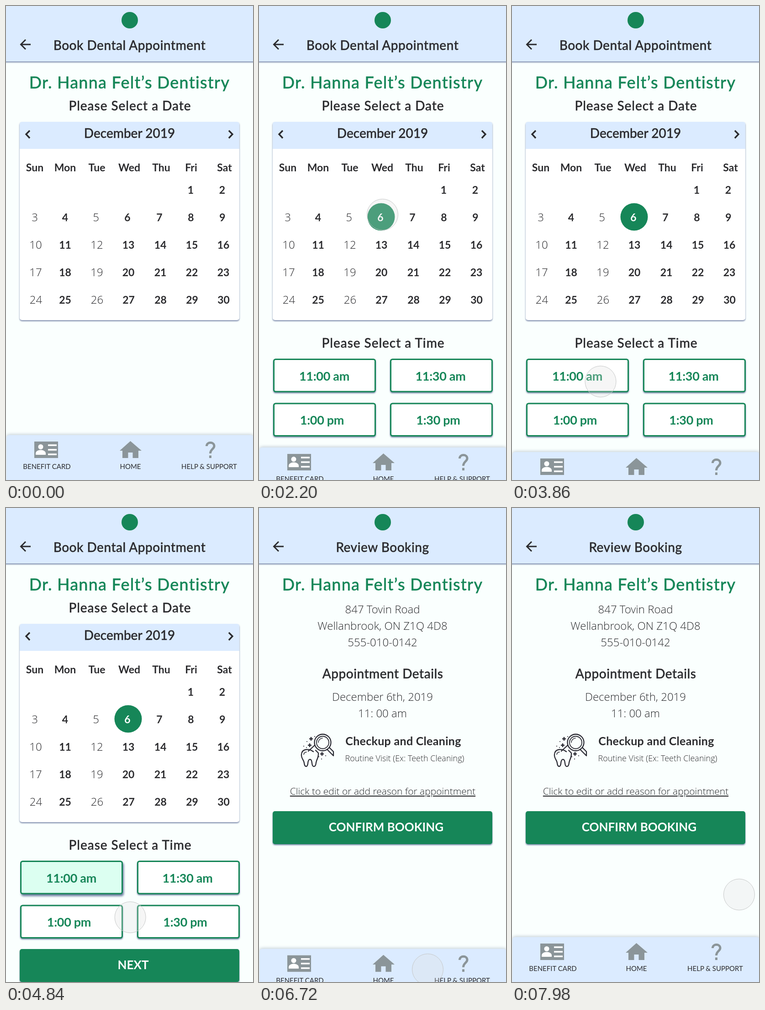
Recreate the animation shown at these times as an HTML page. Size 541 by 1035 pixels, loop 8000 ms.

```html
<!DOCTYPE html>
<html lang="en">
<head>
<meta charset="utf-8">
<title>Appointment booking</title>
<style>
  html, body { margin: 0; width: 100%; height: 100%; overflow: hidden; background: #fafffe; }
  svg { position: fixed; inset: 0; width: 100%; height: 100%; display: block; }
  text { fill: #2b2b2e; font-family: Lato, sans-serif; }
  .title { font-size: 36px; font-weight: 500; letter-spacing: 1.2px; fill: #168658; stroke: #168658; stroke-width: .4px; }
  .head { font-size: 28px; font-weight: 500; letter-spacing: .5px; stroke: #2b2b2e; stroke-width: .4px; }
  .wide { letter-spacing: .95px; }
  .month { letter-spacing: 0; }
  .bold { font-size: 23px; font-weight: 700; }
  .service { font-size: 25px; font-weight: 700; letter-spacing: .3px; }
  .time { font-size: 27px; font-weight: 700; letter-spacing: -.3px; fill: #168658; }
  .action { font-size: 26px; font-weight: 700; fill: #fff; }
  .label { font-size: 15px; }
  .light { font-family: "Open Sans", "Noto Sans", sans-serif; font-weight: 300; font-size: 24px; }
  .note { font-size: 18px; }
  .link { font-size: 21px; text-decoration: underline; }
  .line { fill: none; stroke: #2b2b2e; stroke-width: 3; }
  .shade { filter: drop-shadow(0 2px 1.5px rgba(60, 80, 130, .7)); }
  .chosen { filter: drop-shadow(2px 4px 2px rgba(60, 80, 130, .75)); }
  .lift { filter: drop-shadow(0 -2px 3px rgba(110, 125, 150, .35)); }
</style>
</head>
<body>
<svg id="stage" viewBox="0 0 541 1035" preserveAspectRatio="none" xmlns="http://www.w3.org/2000/svg"></svg>
<script>
const LOOP = 8000, GREEN = '#168658', BLUE = '#dbebff', GREY = '#8b9599';

const text = (x, y, value, cls, extra = '') =>
  `<text x="${x}" y="${y}" class="${cls}" text-anchor="middle" ${extra}>${value}</text>`;
const rect = (x, y, w, h, fill, extra = '') =>
  `<rect x="${x}" y="${y}" width="${w}" height="${h}" fill="${fill}" ${extra}/>`;
const path = (d, extra = 'class="line"') => `<path d="${d}" ${extra}/>`;
const group = (id, body) => `<g id="${id}">${body}</g>`;

function calendar() {
  const headX = [63, 129.5, 199, 270, 340, 405.5, 478.5];
  const dayX = [65, 129.5, 199, 268, 338, 407, 476];
  const rowShift = [-2.5, -2, 0, 0, .5];
  let out = rect(30, 253, 481, 433, '#fff', 'rx="5" class="shade"') +
    path('M30 312V258Q30 253 35 253H506Q511 253 511 258V312Z', `fill="${BLUE}"`) +
    text(270.5, 288, 'December 2019', 'head month') +
    path('M52 272L44 280L52 288.5M488 272L496 280L488 288.5', 'class="line" style="stroke-width:3.4"');
  ['Sun', 'Mon', 'Tue', 'Wed', 'Thu', 'Fri', 'Sat'].forEach((d, i) => out += text(headX[i], 361, d, 'bold'));
  out += `<circle id="picked" cx="267.5" cy="460.5" r="30" fill="${GREEN}"/>`;
  for (let day = 1; day <= 30; day++) {
    const col = (day + 4) % 7, row = Math.floor((day + 4) / 7);
    const closed = col === 0 || col === 2;
    const shift = col === 1 ? 0 : rowShift[row];
    out += text(dayX[col] + shift, 409.5 + row * 60, day, closed ? 'light' : 'bold', day === 6 ? 'id="six"' : '');
  }
  return out;
}

function slot(x, y, textX, value, id = '') {
  return rect(x, y, 222, 70.5, '#fff', `id="${id}" rx="4" stroke="${GREEN}" stroke-width="3" class="shade"`) +
    text(textX, y + 46, value, 'time');
}

const action = (y, value) =>
  rect(30, y, 481, 72, GREEN, 'rx="5" class="shade"') + text(278.5, y + 44, value, 'action');

function toothIcon() {
  const plus = (x, y, s) => `M${x - s} ${y}h${2 * s}M${x} ${y - s}v${2 * s}`;
  return `<g fill="none" stroke="#2b2b34" stroke-width="2.3" stroke-linejoin="round" stroke-linecap="round">
    <circle cx="139.5" cy="512" r="18"/><circle cx="139.5" cy="512" r="13.5" stroke-width="1.8"/>
    ${path('M130 512a9.5 9.5 0 0 1 9-9.5', 'stroke-width="1.5"')}
    ${path('M149 527L163 541V532L154 523M122 518L108 531', '')}
    ${path('M119 532C110 525 94 525 93 538C92 547 98 549 99 557C100 566 106 567 107 558C108 546 115 546 116 557C117 567 124 567 125 556C126 549 131 545 130 535L124 529', '')}
    ${path('M98 538q1-5 6-5', 'stroke-width="1.6"')}
    ${path(plus(114, 504, 4) + plus(111, 518, 4) + plus(138, 537, 4), 'stroke-width="2.6" stroke-linecap="butt"')}
    ${path('M105 510h.1M98 520h.1M122 499h.1M104 523h.1M131 543h.1M146 541h.1M137 548h.1', 'stroke-width="2"')}</g>`;
}

function navBar() {
  return rect(1, 937, 541, 110, BLUE, 'rx="6" class="lift"') +
    rect(62, 951, 52, 36, GREY) +
    `<circle cx="76" cy="962.5" r="5.5" fill="#fff"/>` +
    path('M65 980V977C65 967 87 967 87 977V980Z', 'fill="#fff"') +
    path('M92 959H111M92 969H111M92 979H111', 'stroke="#fff" stroke-width="3.6"') +
    path('M272.5 950L297 971H290V987H277.5V975H267.5V987H255V971H249Z', `fill="${GREY}"`) +
    path('M439.5 961C439.5 951 456 951 456 961C456 967 447.5 968 447.5 977', `fill="none" stroke="${GREY}" stroke-width="5"`) +
    rect(445, 981.5, 5, 5.5, GREY) +
    text(89.5, 1011, 'BENEFIT CARD', 'label') +
    text(272.5, 1011, 'HOME', 'label') +
    text(445, 1011, 'HELP &amp; SUPPORT', 'label');
}

document.getElementById('stage').innerHTML =
  rect(0, 0, 541, 1035, '#fafffe') +
  rect(-5, -5, 551, 126, BLUE, 'class="shade"') +
  `<circle cx="271" cy="31" r="18" fill="${GREEN}"/>` +
  path('M54 84H32.5M43 73.5L32.5 84L43 94.5') +
  text(270.5, 180, 'Dr. Hanna Felt’s Dentistry', 'title') +
  group('booking',
    text(270.5, 96, 'Book Dental Appointment', 'head') +
    text(271.5, 228, 'Please Select a Date', 'head wide') + calendar()) +
  group('times',
    text(272, 746, 'Please Select a Time', 'head wide') +
    slot(32.5, 771.5, 143, '11:00 am', 'morning') + slot(288.5, 771.5, 397.5, '11:30 am') +
    slot(32.5, 868, 138, '1:00 pm') + slot(288.5, 868, 392.5, '1:30 pm')) +
  group('next', action(963, 'NEXT')) +
  group('review',
    text(270.5, 96, 'Review Booking', 'head') +
    text(270.5, 230, '847 Tovin Road', 'light') +
    text(270.5, 266, 'Wellanbrook, ON Z1Q 4D8', 'light') +
    text(270.5, 302, '555-010-0142', 'light') +
    text(271, 372, 'Appointment Details', 'head') +
    text(270.5, 421, 'December 6th, 2019', 'light') +
    text(270.5, 457, '11: 00 am', 'light') +
    toothIcon() +
    text(316, 517.5, 'Checkup and Cleaning', 'service') +
    text(319, 553, 'Routine Visit (Ex: Teeth Cleaning)', 'light note') +
    text(271, 626, 'Click to edit or add reason for appointment', 'light link') +
    action(662, 'CONFIRM BOOKING')) +
  group('nav', navBar()) +
  `<circle id="cursor" r="34" fill="#dedede" fill-opacity=".27" stroke="#c6c8c8" stroke-width="1"/>`;

const el = id => document.getElementById(id);

// Pointer keys: time, x, y
const keys = [
  [0, 576, -36], [300, 576, -36], [700, 410, 260], [1100, 315.5, 430.5], [1380, 270.5, 454.5],
  [1960, 270.5, 454.5], [2100, 270.5, 455.5], [2920, 270.5, 455.5], [3240, 212, 625],
  [3500, 180.5, 745], [3740, 194, 820], [4520, 194, 820], [4840, 272, 893.5],
  [5340, 325.5, 974.5], [5680, 369.5, 1007.5], [7060, 369.5, 1007.5],
  [7240, 405.5, 978.5], [7980, 497.5, 844], [LOOP, 497.5, 844]
];

// Slope at a key; flat at holds and turning points
function slope(i, axis) {
  const before = keys[i - 1], here = keys[i], after = keys[i + 1];
  if (!before || !after) return 0;
  if ((here[axis] - before[axis]) * (after[axis] - here[axis]) <= 0) return 0;
  return (after[axis] - before[axis]) / (after[0] - before[0]);
}

function pointer(t, axis) {
  const i = keys.findIndex((k, n) => n === keys.length - 2 || t < keys[n + 1][0]);
  const a = keys[i], b = keys[i + 1], span = b[0] - a[0], u = (t - a[0]) / span;
  const s = u * u * (3 - 2 * u);
  return a[axis] + (b[axis] - a[axis]) * s +
    span * u * (1 - u) * ((1 - u) * slope(i, axis) - u * slope(i + 1, axis));
}

// Each screen change: start time, resting offset of the bottom bar
const changes = [[1960, 37], [3860, 134], [6440, 0]];
const LAG = 60, GLIDE = 500;

function draw(t) {
  let screen = 0, offset = 0;
  for (const [start, target] of changes) {
    if (t < start + LAG) break;
    const left = 1 - Math.min(1, (t - start) / GLIDE);
    offset = target + (offset - target) * left * left;
    screen++;
  }
  const show = (id, on) => el(id).setAttribute('display', on ? 'inline' : 'none');
  show('booking', screen < 3);
  show('picked', screen > 0);
  show('times', screen === 1 || screen === 2);
  show('next', screen === 2);
  show('review', screen === 3);
  el('six').style.fill = screen ? '#fff' : '';
  el('morning').setAttribute('fill', screen === 2 ? '#dcfff1' : '#fff');
  el('morning').setAttribute('class', screen === 2 ? 'chosen' : 'shade');
  el('nav').setAttribute('transform', `translate(0 ${offset.toFixed(2)})`);
  el('cursor').setAttribute('cx', pointer(t, 1).toFixed(2));
  el('cursor').setAttribute('cy', pointer(t, 2).toFixed(2));
}

const begin = performance.now();
function tick() {
  draw((performance.now() - begin) % LOOP);
  requestAnimationFrame(tick);
}
tick();
</script>
</body>
</html>
```
